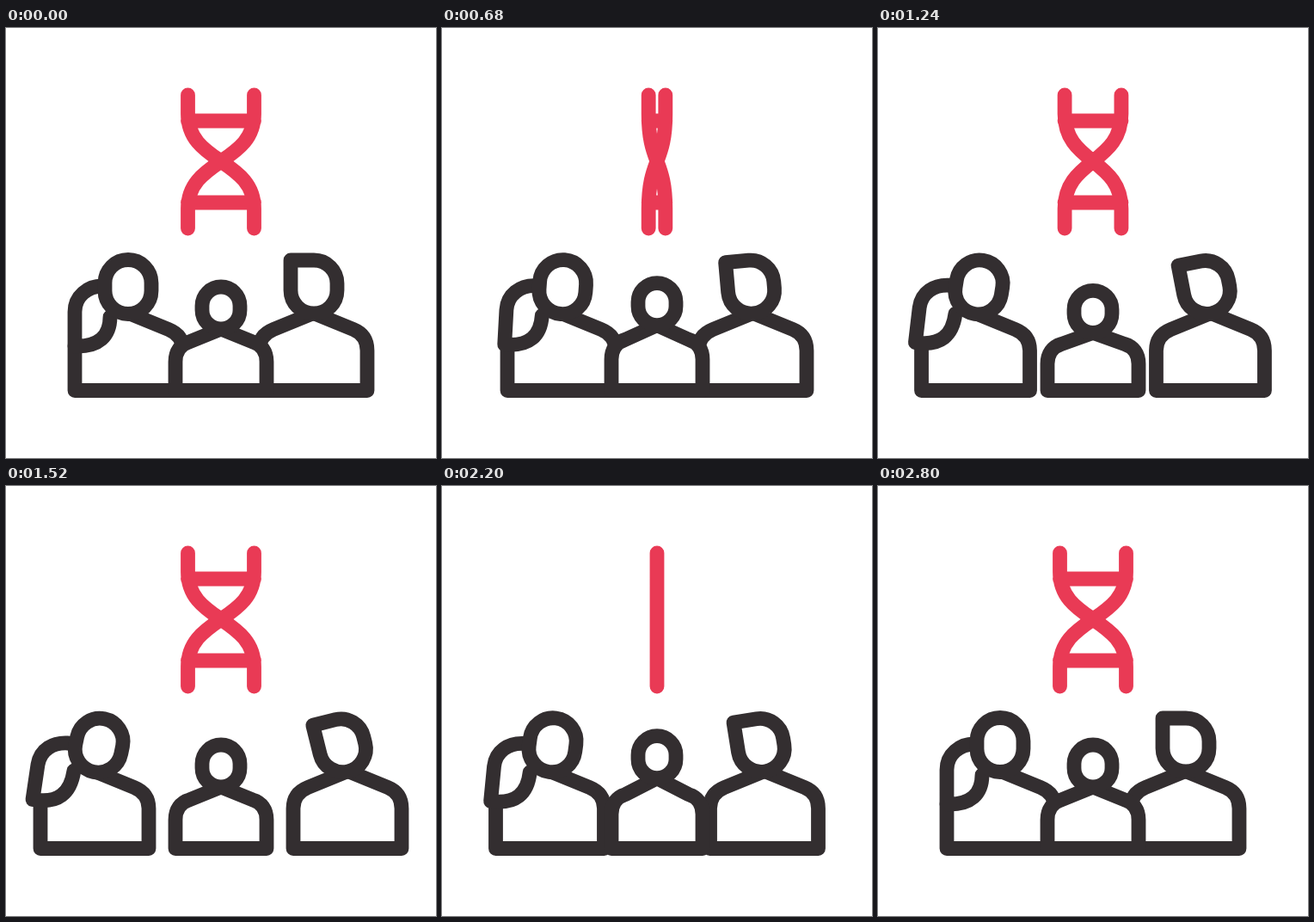
These frames come from a looping animation (500 px wide and 500 px high, 3 s). An HTML page:

```html
<!DOCTYPE html>
<html lang="en">
<head>
<meta charset="utf-8">
<title>Family genetics</title>
<style>
  html, body { margin: 0; width: 100%; height: 100%; overflow: hidden; background: #fff; }
  svg { display: block; width: 100%; height: 100%; }
  .line { fill: none; stroke: #332e30; stroke-width: 16.8; stroke-linecap: round; stroke-linejoin: round; }
  .solid { fill: #fff; }
  .dna { stroke: #e93a55; }
</style>
</head>
<body>
<svg viewBox="0 0 500 500">
  <path id="dna" class="line dna"/>
  <g id="mom">
    <path class="line" d="M80 370V421.5H206V375C206 363 200 355 189 350.5L142.5 331.5"/>
    <path id="hair" class="line solid"/>
    <rect id="momHead" class="line solid" x="115" y="269.5" width="54" height="63" rx="27"/>
  </g>
  <g id="dad">
    <path class="line" d="M357.5 331.5L404 350.5C415 355 420 363 420 375V421.5H294V375C294 363 300 355 311 350.5Z"/>
    <path id="dadHead" class="line solid" d="M331 270H358A27 27 0 0 1 385 297V305A27 27 0 0 1 331 305Z"/>
  </g>
  <path id="body" class="line solid"/>
  <rect id="head" class="line solid" x="228" y="301" width="44" height="49" rx="22"/>
</svg>
<script>
const LOOP = 3000, STEP = 40;
const $ = id => document.getElementById(id);
const set = (id, name, value) => $(id).setAttribute(name, value);
const mix = (a, b, p) => a + (b - a) * p;

// cubic-bezier(x1, 0, x2, 1)
function bezier(x1, x2) {
  return u => {
    let lo = 0, hi = 1, s = 0.5;
    for (let i = 0; i < 24; i++) {
      s = (lo + hi) / 2;
      const x = 3 * (1 - s) * (1 - s) * s * x1 + 3 * (1 - s) * s * s * x2 + s * s * s;
      if (x < u) lo = s; else hi = s;
    }
    return s * s * (3 - 2 * s);
  };
}
const linear = u => u;
const soft = bezier(0.22, 0.78);
const lateIn = bezier(0.76, 0.73);
const earlyOut = bezier(0.27, 0.24);

// keys: [time, value, easing towards this key]
function track(keys, t) {
  if (t <= keys[0][0]) return keys[0][1];
  for (let i = 1; i < keys.length; i++) {
    const [t0, v0] = keys[i - 1], [t1, v1, ease = linear] = keys[i];
    if (t < t1) return mix(v0, v1, ease((t - t0) / (t1 - t0)));
  }
  return keys[keys.length - 1][1];
}

const hop = start => [[0, 0], [240, 10], [600, -10.3], [900, 8], [1200, 0]]
  .map(([t, y]) => [start + t, y, soft]);

const SPIN = [[200, 38.5], [1400, -38.5, soft], [1600, -38.5], [2800, 38.5, soft]];
const APART = [[200, 0], [1520, 40, lateIn], [1880, 40], [2800, 0, earlyOut]];
const TILT = [[200, 0], [1520, 1], [1880, 1], [2800, 0]];
const HOP = [...hop(200), ...hop(1600)];

// Hair outline upright and leaning, as x,y pairs
const HAIR = [112, 300, 95, 300, 80, 312, 80, 330, 80, 370, 108, 371, 121, 358, 121, 336];
const LEAN = [112, 299, 95, 298, 80, 306, 77, 324, 71, 364.5, 101, 370, 115, 357, 119, 331];

function hairPath(p) {
  const n = HAIR.map((v, i) => mix(v, LEAN[i], p).toFixed(2));
  return `M${n.slice(0, 2)}C${n.slice(2, 8)}L${n.slice(8, 10)}C${n.slice(10)}`;
}

function dnaPath(w) {
  const x = k => 250 + k * w;
  const strand = k =>
    `M${x(-k)} 78V100C${x(-k)} 128 ${x(-k * 0.54)} 141 250 155` +
    `C${x(k * 0.54)} 169 ${x(k)} 182 ${x(k)} 210V233`;
  const rung = y => `M${x(-1)} ${y}H${x(1)}`;
  return strand(1) + strand(-1) + rung(108) + rung(203);
}

function bodyPath(dy) {
  const s = dy * 0.6;
  return `M250 ${350 + dy}L287 ${365 + s}C297 ${368 + s} 303 ${376 + s} 303 ${388 + s}` +
    `V421.5H197V${388 + s}C197 ${376 + s} 203 ${368 + s} 213 ${365 + s}Z`;
}

function draw(t) {
  const shift = track(APART, t), tilt = track(TILT, t), dy = track(HOP, t);
  set('dna', 'd', dnaPath(track(SPIN, t)));
  set('mom', 'transform', `translate(${-shift} 0)`);
  set('dad', 'transform', `translate(${shift} 0)`);
  set('hair', 'd', hairPath(tilt));
  set('momHead', 'transform', `rotate(${11.5 * tilt} 142 332)`);
  set('dadHead', 'transform', `rotate(${-14 * tilt} 357.5 332)`);
  set('body', 'd', bodyPath(dy));
  set('head', 'transform', `translate(0 ${dy})`);
}

const start = performance.now();
function tick() {
  const t = (performance.now() - start) % LOOP;
  draw(Math.floor(t / STEP) * STEP);
  requestAnimationFrame(tick);
}
tick();
</script>
</body>
</html>
```
